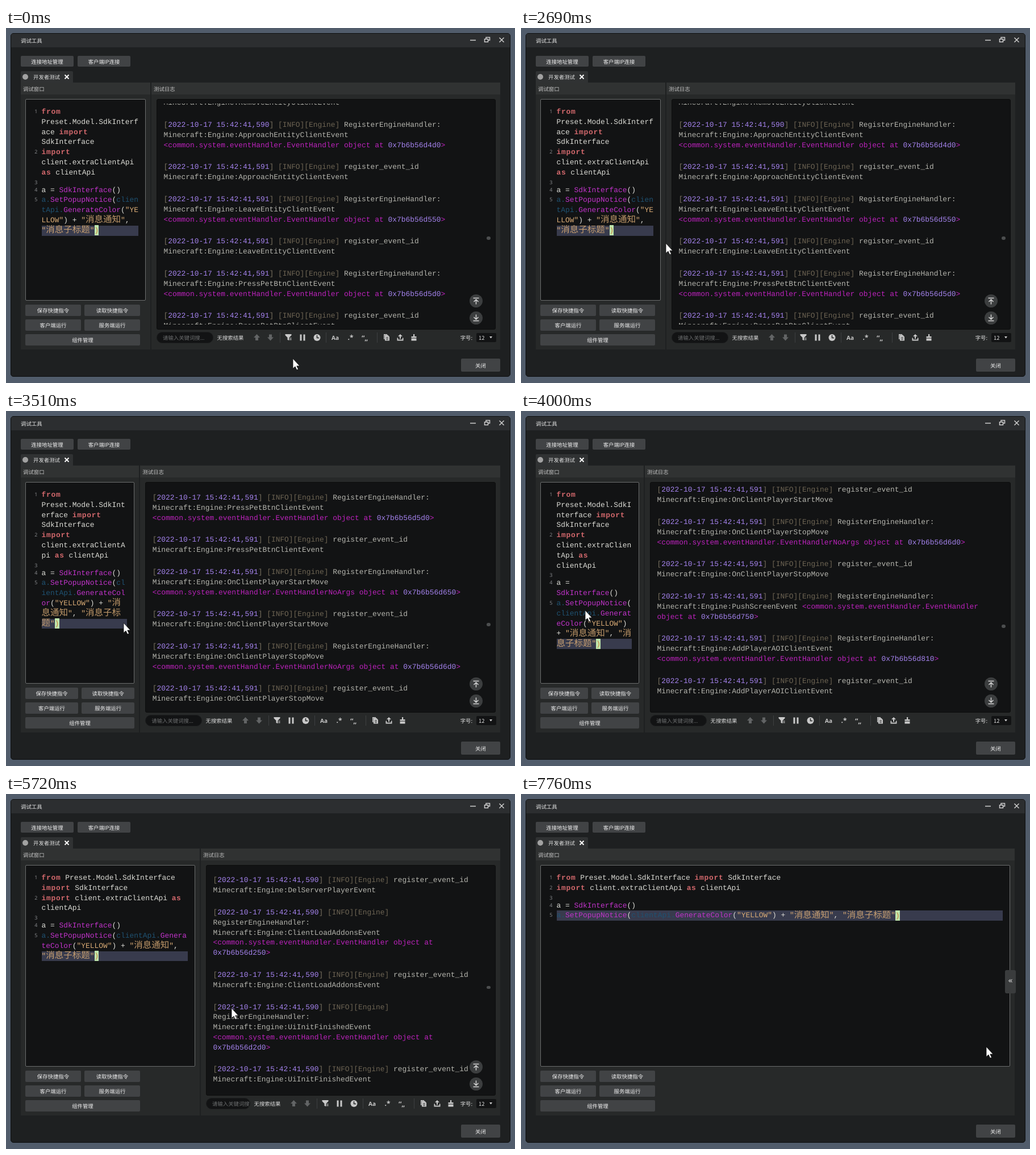
An HTML page for the animation above (8 s loop, 896 px wide and 625 px high).

```html
<!DOCTYPE html>
<html lang="zh-CN">
<head>
<meta charset="utf-8">
<title>调试工具</title>
<style>
html, body { margin: 0; width: 100%; height: 100%; overflow: hidden; background: #515c6b; }
* { box-sizing: border-box; }
#stage { position: absolute; left: 0; top: 0; width: 896px; height: 625px; overflow: hidden; --split: 265; --search: 100;
  font: 9.4px/12px "Noto Sans CJK SC", "Noto Sans CJK", sans-serif; color: #e2e2e2; text-rendering: geometricPrecision; }
#stage div, #stage svg { position: absolute; }
.window { left: 8px; top: 9px; width: 880px; height: 605px; background: #1e2021; border: 1px solid #0e0f10; border-radius: 5px; overflow: hidden; }
.title { left: 0; top: 0; width: 100%; height: 24px; background: #2c2e30; }
.label { white-space: nowrap; }
#stage .btn { display: flex; align-items: center; justify-content: center; background: #414345; border-radius: 2px; color: #f0f0f0; white-space: nowrap; }
.tab { left: 26px; top: 76px; width: 92px; height: 21px; background: #303233; border-radius: 2px 2px 0 0; }
.dot { left: 3px; top: 5px; width: 10px; height: 10px; border-radius: 50%; background: #a2a2a2; }
.panel { top: 96px; height: 470px; background: #272929; overflow: hidden; }
.head { left: 0; top: 0; width: 100%; height: 21px; background: #303232; color: #c4c4c4; padding: 5px 4px; white-space: nowrap; }
#left { left: 26px; width: calc(var(--split) * 1px - 37px); }
#right { left: calc(var(--split) * 1px - 9px); right: 26px; }

.code { font: 12.92px/17.8px "Liberation Mono", monospace; overflow-wrap: break-word; }
.code i { position: relative; top: .5px; opacity: .88; font: 300 15.5px/0 "Noto Sans CJK SC", "Noto Sans CJK", sans-serif; }
#editor { left: 8px; top: 29px; width: calc(var(--split) * 1px - 53px); height: 355px; background: #121314; border: 1px solid #6b6d6d;
  border-radius: 2px; isolation: isolate; counter-reset: row; overflow: hidden; }
#lines { left: 27.5px; right: 12px; top: 13px; color: #dcdcd6; }
#stage .line { position: relative; min-height: 13px; counter-increment: row; }
.line::before { content: counter(row); position: absolute; left: -20px; width: 13px; text-align: right;
  font: 9px/15px "Noto Sans", sans-serif; color: #85878a; }
.line:last-child::after { content: ""; position: absolute; left: 0; bottom: 0; width: 100%; height: 17.8px; background: #383b4d; z-index: -1; }
.key { color: #d2686c; font-weight: bold; letter-spacing: .75px; }
.call { color: #c233cb; }
.ref { color: #1f5272; }
.str { color: #d9ab75; }
.caret { background: #bfe6ac; color: #c87f3a; padding: 1.6px 0; }
#tools { left: 8px; top: 391px; width: min(202px, calc(var(--split) * 1px - 53px)); height: 72px; }
#tools .btn { height: 20px; width: calc(50% - 3px); }

#log { left: 9px; right: 8px; top: 29px; height: 406px; background: #121314; border: 1px solid #0c0d0d; border-radius: 3px; }
#clip { left: 11.5px; right: 47px; top: 7px; height: 389px; overflow: hidden; }
#list { left: 0; top: 0; width: 100%; color: #b5b5ae; }
#stage #list div { position: static; padding-bottom: 21px; }
.dim { color: #77705f; }
.tag { color: #6d6453; }
.num { color: #a583ee; }
.obj { color: #bd22bd; }
.brace { color: #c58a68; }
#thumb { right: 8px; width: 7px; height: 6px; border-radius: 3px; background: #4c4e4f; }
.round { right: 31.5px; width: 23px; height: 23px; }
#search { left: 9px; top: 439px; width: calc(var(--search) * 1px); height: 20px; border-radius: 10px; background: #121314;
  border: 1px solid #1b1c1d; color: #6c6e6f; padding: 3px 10px; white-space: nowrap; overflow: hidden; }
#icons { left: calc(var(--search) * 1px + 9px); top: 439px; }
.size { right: 7px; top: 441px; width: 35px; height: 16px; border-radius: 2px; background: #121314; padding: 2px 4px; }
#stage .grip { top: 310px; width: 19px; height: 41px; background: #3a3c3d; border-radius: 3px; font: 14px/38px "DejaVu Sans", sans-serif; text-align: center; color: #dedede; }
#pointer { left: 0; top: 0; overflow: visible; }
</style>
</head>
<body>
<div id="stage">
  <div class="window"><div class="title"></div></div>
  <div class="label" style="left:26px;top:16px">调试工具</div>
  <svg width="70" height="20" style="left:812px;top:11px" fill="none" stroke="#cfcfcf" stroke-width="1.5">
    <path d="M5 10.5h10M56.500 6l8 8m0-8l-8 8"/><path d="M30.500 8.500h6v5h-6zM33 8V5.500h6.500v5H37"/>
  </svg>
  <div class="btn" style="left:26px;top:49px;width:93px;height:19px">连接地址管理</div>
  <div class="btn" style="left:126px;top:49px;width:93px;height:19px">客户端IP连接</div>
  <div class="tab">
    <div class="dot"></div>
    <div class="label" style="left:22px;top:4px">开发者测试</div>
    <svg width="12" height="12" style="left:75px;top:4px" stroke="#fff" stroke-width="1.800"><path d="M2.500 2.500l7 7m0-7l-7 7"/></svg>
  </div>

  <div class="panel" id="left">
    <div class="head">调试窗口</div>
    <div id="editor"><div id="lines" class="code"></div></div>
    <div id="tools">
      <div class="btn" style="left:0;top:0">保存快捷指令</div>
      <div class="btn" style="right:0;top:0">读取快捷指令</div>
      <div class="btn" style="left:0;top:26px">客户端运行</div>
      <div class="btn" style="right:0;top:26px">服务端运行</div>
      <div class="btn" style="left:0;top:52px;width:100%">组件管理</div>
    </div>
  </div>

  <div class="panel" id="right">
    <div class="head">测试日志</div>
    <div id="log">
      <div id="clip"><div id="list" class="code"></div></div>
      <div id="thumb"></div>
    </div>
    <svg class="round" style="top:373px" viewBox="-11.500 -11.500 23 23"><circle r="11.500" fill="#3c3e3f"/><path d="M-5-5H5M0 6V-2M-4 1.500L0-2.500L4 1.500" fill="none" stroke="#d5d5d5" stroke-width="1.500"/></svg>
    <svg class="round" style="top:402.500px" viewBox="-11.500 -11.500 23 23"><circle r="11.500" fill="#3c3e3f"/><path d="M-5 5H5M0-6V2M-4-1.500L0 2.500L4-1.500" fill="none" stroke="#d5d5d5" stroke-width="1.500"/></svg>
    <div id="search">请输入关键词搜...</div>
    <svg id="icons" width="366" height="20" fill="#c9c9c9">
      <text x="6.500" y="13.500" font-size="9.400" fill="#dcdcdc">无搜索结果</text>
      <path fill="#626465" d="M76.500 4l-5.500 6h3v5h5v-5h3zM100.500 15.500l5.500-6h-3v-5h-5v5h-3z"/>
      <path fill="#3d3f40" d="M117 1h1v18h-1zM198 1h1v18h-1zM288 1h1v18h-1z"/>
      <path d="M126.500 4h11v2l-4 4v5l-3-1v-4l-4-4zM134.500 10.500h3v1.300h-3zM134.500 13h3v1.300h-3zM152.500 4.500h3v11h-3zM158.500 4.500h3v11h-3z"/>
      <circle cx="182.500" cy="10" r="6"/><path d="M182.500 6v4.500h3.500" fill="none" stroke="#272929" stroke-width="1.500"/>
      <g font-family="Open Sans, sans-serif" font-weight="bold">
        <text x="208" y="14" font-size="10">Aa</text><text x="236.500" y="14" font-size="12">.*</text><text x="261" y="15" font-size="12">“„</text>
      </g>
      <path d="M300 4h6v1.500h-4.500V13H300z"/><path d="M302 5.500h5l3 3V15.500h-8z"/>
      <path d="M304 9.500h4M304 11.500h4M304 13.500h4" stroke="#272929" stroke-width=".8"/>
      <path d="M329 4l4 4h-3v4h-2V8h-3zM323.500 10.500h1.800v3h7.400v-3h1.800V15.500h-11z"/>
      <path d="M352 4h2.200v4h3.300v2.500h-9V8H352zM348.500 11.500h9v4h-9z"/>
    </svg>
    <div class="label" style="right:49px;top:443px">字号:</div>
    <div class="size">12<svg width="5" height="4" style="left:23px;top:6px"><path d="M0 0h5L2.500 3.500z" fill="#d0d0d0"/></svg></div>
  </div>

  <div class="grip" id="openLeft" style="left:25px">»</div>
  <div class="grip" id="openRight" style="left:852px">«</div>
  <div class="btn" style="left:801px;top:582px;width:69px;height:23px">关闭</div>
  <svg id="pointer" width="14" height="21"><path d="M0 0V17.500L4 14L6.800 20L9.500 18.800L6.800 13H12z" fill="#fff" stroke="#111" stroke-width=".8"/></svg>
</div>

<script>
const $ = id => document.getElementById(id);
const span = (cls, text) => `<span class="${cls}">${text}</span>`;
const wide = html => html.replace(/[\u4e00-\u9fff]+/g, '<i>$&</i>');
const rows = (list, cls) => list.map(html => `<div class="${cls}">${wide(html)}</div>`).join('');

const key = word => span('key', word), call = name => span('call', name);
const ref = name => span('ref', name), str = text => span('str', `"${text}"`);
$('lines').innerHTML = rows([
  `${key('from')} Preset.Model.SdkInterface ${key('import')} SdkInterface`,
  `${key('import')} client.extraClientApi ${key('as')} clientApi`,
  '',
  `a = ${call('SdkInterface')}()`,
  `${ref('a.')}${call('SetPopupNotice')}(${ref('clientApi.')}${call('GenerateColor')}(${str('YELLOW')}) + ` +
    `${str('消息通知')}, ${str('消息子标题')}${span('caret', ')')}`
], 'line');

const entry = (time, text) =>
  `${span('dim', '[')}${span('num', '2022-10-17 15:42:' + time)}${span('dim', ']')} ${span('tag', '[INFO][Engine]')} ${text}`;
const object = (name, addr) => span('obj', `&lt;${name} object at ${span('num', '0x7b6' + addr)}&gt;`);
const register = (time, event, addr, handler = 'EventHandler') =>
  entry(time, `RegisterEngineHandler: Minecraft:Engine:${event} ${object('common.system.eventHandler.' + handler, addr)}`);
const eventId = (time, event) => entry(time, `register_event_id Minecraft:Engine:${event}`);
const pair = (time, event, addr, handler) => [register(time, event, addr, handler), eventId(time, event)];
const braces = text => text.replace(/[{}]/g, c => span('brace', c));

const info = "{'info': {'level_id': 'bQdNY6FaHQA=', 'enter_way': 'self'}, 'type': 'local'}";
const report = text => entry('41,602', 'ReportScreenController' + text);

const server = [
  'framework server finished',
  ...pair('40,638', 'SyncModDataEvent', 'aa040d0'),
  register('40,638', 'EntityRemoveEvent', 'aa04150'),
  ...pair('40,639', 'AddServerPlayerServerEvent', 'aa041d0')
];
const startup = ['DelServerPlayer', 'ClientLoadAddons', 'UiInitFinished', 'LoadClientAddon', 'AddEntityClient', 'RemoveEntityClient']
  .flatMap((name, i) => pair('41,590', name + 'Event', 'b56d' + (0x1d0 + i * 0x80).toString(16)));
const client = [
  register('41,590', 'ApproachEntityClientEvent', 'b56d4d0'),
  eventId('41,591', 'ApproachEntityClientEvent'),
  ...pair('41,591', 'LeaveEntityClientEvent', 'b56d550'),
  ...pair('41,591', 'PressPetBtnClientEvent', 'b56d5d0'),
  ...pair('41,591', 'OnClientPlayerStartMove', 'b56d650', 'EventHandlerNoArgs'),
  ...pair('41,591', 'OnClientPlayerStopMove', 'b56d6d0', 'EventHandlerNoArgs'),
  register('41,591', 'PushScreenEvent', 'b56d750'),
  ...pair('41,591', 'AddPlayerAOIClientEvent', 'b56d810')
];
const screens = [
  register('41,602', 'notify_player_chat_panel_event', 'b5bc890'),
  report('. report_type 恶意玩家,其他,外挂,发布不良信息,不雅昵称,语言暴力,'),
  report(`. storage ${object('log_mgr.LogMgr', '80e2c50')} ${braces(`{'playing_world': ${info}}`)}`),
  report(`. playing_world ${braces(info)}`),
  report(`.init ${object('report_screen_controller.ReportScreenController', 'b5bc490')}`),
  entry('41,602', 'PlayerTipsScreenController.__init__'),
  register('41,602', 'notify_player_head_image_event', 'b5bc850')
];
$('list').innerHTML = rows([...server, ...startup, ...client, ...screens], 'entry');
const entries = [...$('list').children];
const clientAt = server.length + startup.length, screensAt = clientAt + client.length;

// Keys are [input, ...values], linearly interpolated.
function interpolate(keys, x) {
  const last = keys[keys.length - 1];
  if (x >= last[0]) return last.slice(1);
  const i = Math.max(1, keys.findIndex(k => k[0] > x));
  const [a, b] = [keys[i - 1], keys[i]];
  const f = Math.max(0, (x - a[0]) / (b[0] - a[0]));
  return a.slice(1).map((v, j) => v + (b[j + 1] - v) * f);
}

const LOOP = 8000, STEP = 70;
const moveStarts = [0, 790, 2020, 2220, 2550, 3020, 4950];
const pointerKeys = [
  [790, 505, 582], [1630, 252, 384], [2020, 252, 384], [2090, 253, 383], [2220, 253, 383], [2290, 265, 383],
  [2550, 265, 383], [2690, 255, 379], [3020, 255, 379], [3300, 241, 381], [3860, 150, 360], [4000, 113, 351],
  [4490, 50, 346], [4950, 50, 346], [5370, 228, 348], [6490, 768, 440], [6630, 800, 443], [6770, 819, 445]
];
const splitKeys = [
  [3020, 265], [3300, 263.5], [3720, 227], [4070, 227], [4140, 36.5], [5370, 36.5], [5440, 240], [5860, 408], [6490, 408], [6560, 880]
];
// Split position to first visible entry (fractional), thumb centre and thumb height.
const scrollKeys = [
  [36.5, screensAt + .595, 417, 6], [227, clientAt + 7.078, 379, 6], [263.5, clientAt + .595, 372, 6],
  [265, clientAt - .479, 370, 6], [408, .095, 321, 4]
];

let shownSplit;
function layout(split) {
  if (split === shownSplit) return;
  shownSplit = split;
  const noLeft = split < 100, noRight = split > 800;
  const style = $('stage').style;
  style.setProperty('--split', split);
  style.setProperty('--search', noLeft ? 170 : Math.max(22, Math.min(100, 430 - split)));
  $('left').style.display = noLeft ? 'none' : '';
  $('right').style.display = noRight ? 'none' : '';
  $('openLeft').style.display = noLeft ? '' : 'none';
  $('openRight').style.display = noRight ? '' : 'none';
  if (noRight) return;
  const [position, thumb, height] = interpolate(scrollKeys, split);
  const index = Math.floor(position);
  const first = entries[index].getBoundingClientRect();
  const offset = first.top - $('list').getBoundingClientRect().top + first.height * (position - index);
  $('list').style.transform = `translateY(${Math.round(1.5 - offset)}px)`;
  $('thumb').style.top = thumb - 126 - height / 2 + 'px';
  $('thumb').style.height = height + 'px';
}

const begin = performance.now();
function frame() {
  const time = (performance.now() - begin) % LOOP;
  const start = moveStarts.filter(s => s <= time).pop();
  const snapped = start + Math.floor((time - start) / STEP) * STEP;
  const [x, y] = interpolate(pointerKeys, snapped);
  $('pointer').style.transform = `translate(${Math.round(x)}px, ${Math.round(y)}px)`;
  layout(interpolate(splitKeys, snapped)[0]);
  requestAnimationFrame(frame);
}
frame();
</script>
</body>
</html>
```
